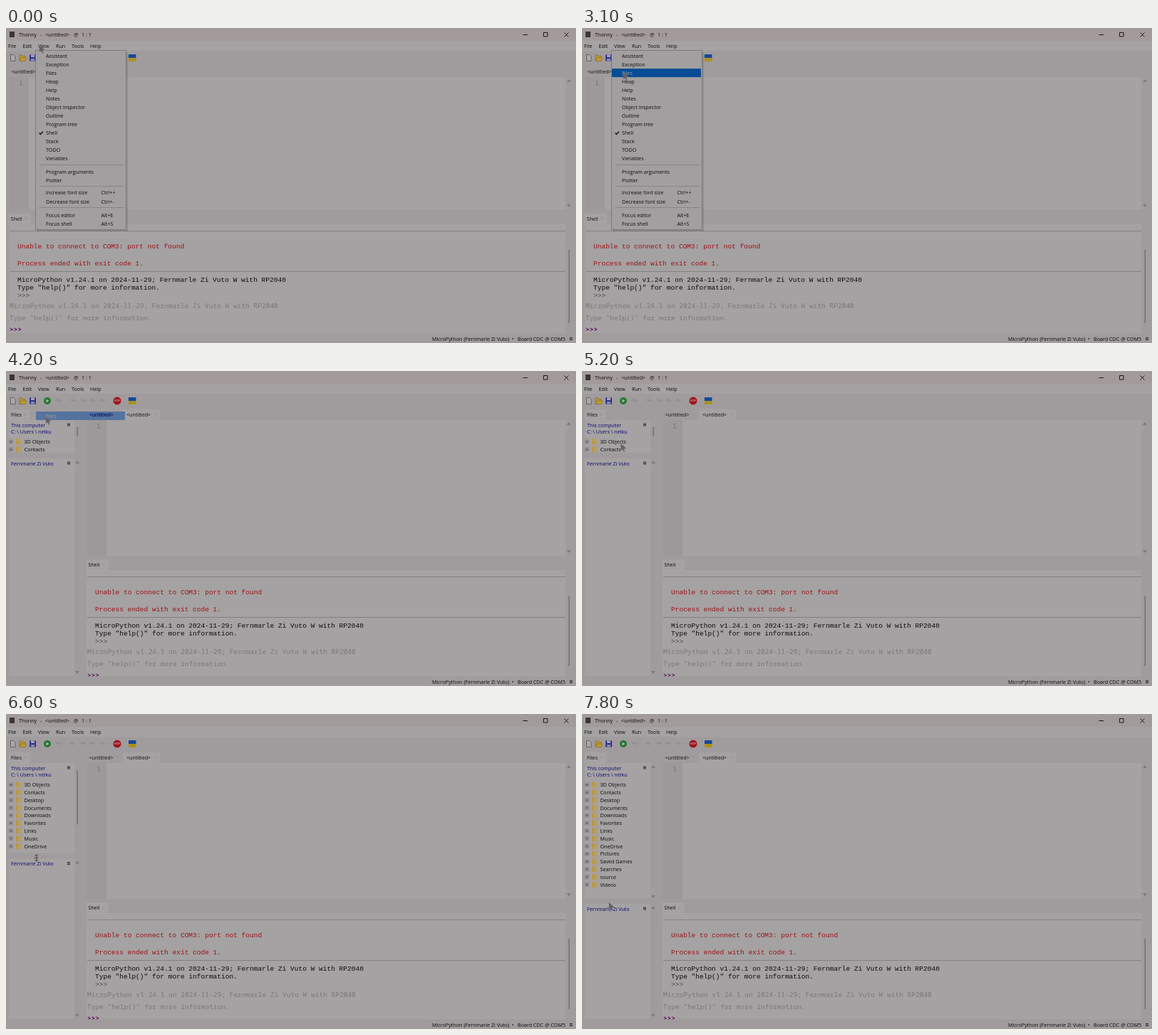
Recreate the animation shown at these times as an HTML page. Size 800 by 443 pixels, loop 8100 ms.

```html
<!DOCTYPE html>
<html lang="en">
<head>
<meta charset="utf-8">
<style>
  html, body { margin: 0; height: 100%; overflow: hidden; background: #a09c9d; }
  svg { display: block; width: 100vw; height: 100vh; }
  text { font: 7.2px "Open Sans", sans-serif; fill: #0d0b0c; white-space: pre; }
  .mono { font: 9.52px "Liberation Mono", monospace; }
  .log { font: 9.52px "Noto Sans Mono", monospace; fill: #7b7778; }
  .prompt { font: bold 9.52px "Noto Sans Mono", monospace; fill: #5a0a55; }
  .number { font: 9.52px "Noto Sans Mono", monospace; fill: #737072; }
  .stop { font: bold 3.2px "Open Sans", sans-serif; fill: #b8a5a6; text-anchor: middle; }
  .red { fill: #9c1216; }
  .blue { fill: #0a0870; }
  .dim { fill: #4b494b; }
  .pale { fill: #a5a2a3; }
</style>
</head>
<body>
<svg id="stage" viewBox="0 0 800 443" preserveAspectRatio="none"></svg>
<script>
const LOOP = 8100, STEP = 100;
const CHROME = '#a09c9d', PAPER = '#a5a2a3', GUTTER = '#9d999b', INK = '#0d0b0c';
const BOARD = 'Fernmarle Zi Vuto';
const CLOSE = 4100;
const FOLDERS = ['3D Objects', 'Contacts', 'Desktop', 'Documents', 'Downloads', 'Favorites', 'Links',
  'Music', 'OneDrive', 'Pictures', 'Saved Games', 'Searches', 'source', 'Videos'];
const VIEWS = ['Assistant', 'Exception', 'Files', 'Heap', 'Help', 'Notes', 'Object inspector', 'Outline',
  'Program tree', 'Shell', 'Stack', 'TODO', 'Variables'];

const escape = s => s.replace(/&/g, '&amp;').replace(/</g, '&lt;').replace(/>/g, '&gt;');
// y is the middle of the line
const text = (x, y, s, cls = '') => `<text x="${x}" y="${y + 2.6}" class="${cls}">${escape(s)}</text>`;
const rect = (x, y, w, h, fill, extra = '') =>
  `<rect x="${x}" y="${y}" width="${w}" height="${h}" fill="${fill}" ${extra}/>`;
const path = (d, stroke, width = 1, fill = 'none') =>
  `<path d="${d}" stroke="${stroke}" stroke-width="${width}" fill="${fill}"/>`;
const circle = (x, y, r, fill) => `<circle cx="${x}" cy="${y}" r="${r}" fill="${fill}"/>`;
const arrow = (x, y, dir) => path(`M${x - 3} ${y + 2 * dir}h6l-3 ${-4 * dir}z`, 'none', 0, '#7d797b');
const bars = (x, y) => path(`M${x - 2} ${y - 1.5}h4m-4 1.5h4m-4 1.5h4`, '#1c1a1b', 0.8);
const cross = (x, y) => path(`M${x - 1.5} ${y - 1.5}l3 3m0 -3l-3 3`, '#8f8b8d', 0.6);

// interpolates through [time, value] points
function track(t, points) {
  if (t <= points[0][0]) return points[0][1];
  for (let i = 1; i < points.length; i++) {
    const [t0, v0] = points[i - 1], [t1, v1] = points[i];
    if (t <= t1) return v0 + (v1 - v0) * (t - t0) / (t1 - t0);
  }
  return points[points.length - 1][1];
}

function windowBar() {
  return rect(0, 0, 800, 443, CHROME) + rect(0, 0, 800, 18, '#a39b99') + rect(0, 18, 800, 14, PAPER)
    + rect(5, 5, 7, 8, '#3a3738')
    + text(18, 9, 'Thonny') + text(48, 9, '-') + text(55, 9, '<untitled>') + text(95, 9, '@') + text(106, 9, '1 : 1')
    + path('M725.5 9.5h6.5M754.5 6.5h5.5v5.5h-5.5zM783.5 6.5l6 6m0 -6l-6 6', INK, 0.9)
    + [[3, 'File'], [23.5, 'Edit'], [45, 'View'], [70, 'Run'], [92, 'Tools'], [118, 'Help']]
      .map(([x, s]) => text(x, 25.5, s)).join('');
}

function toolbar() {
  const steps = [73, 93, 108, 121, 135]
    .map(x => path(`M${x - 3} 42q3 -4 5 0m-2 -1l2 2l2 -2`, '#918d8f', 1.3)).join('');
  return path('M6.5 37.5h4l2.5 2.5v6.5h-6.5z', '#555254', 0.8, '#aaa8a9')
    + path('M19 46v-8h3l1 1.5h4v2', '#8a6a1c', 0.8, '#b89a42') + path('M19 46.5l2 -4.5h8l-2 4.5z', '#7d5f16', 0.6, '#c09c35')
    + rect(33, 37.5, 9, 9, '#30318c') + rect(35, 37.5, 5, 3.5, '#a5a2b5') + rect(35, 43, 5, 3.5, '#8c8aa6')
    + circle(58, 42, 5, '#1f7a2e') + path('M56.5 39.5l4 2.5l-4 2.5z', 'none', 0, '#b0b5ae')
    + steps
    + path('M153.8 36.7h4.4l3.1 3.1v4.4l-3.1 3.1h-4.4l-3.1 -3.1v-4.4z', 'none', 0, '#a0141a')
    + text(156, 40.6, 'STOP', 'stop')
    + rect(172, 37, 10.5, 5, '#17479a') + rect(172, 42, 10.5, 5, '#ab911b');
}

// x and y move when the side pane opens
function workspace(open) {
  const x = open ? 109 : 0, y = open ? 4 : 0, left = 4 + x, bottom = open ? 260 : 255;
  const width = 781 - x;
  return text(left + 3.5, 61, '<untitled>') + cross(left + 44, 61)
    + rect(left + 51, 54, 52, 15, PAPER) + text(left + 56, 61, '<untitled>') + cross(left + 97, 61)
    + rect(left, 69, width, bottom - 69, PAPER) + rect(left, 69, 28, bottom - 69, GUTTER)
    + text(x + 18, 78, '1', 'number')
    + arrow(790, 74, 1) + arrow(790, 250 + y, -1)
    + rect(left, 261 + y, 31, 15, PAPER) + text(x + 6.5, 268 + y, 'Shell') + cross(x + 28, 268 + y)
    + rect(left, 276 + y, width, 154 - y, PAPER)
    + path(`M${x + 5} ${285.5 + y}H785M${x + 5} ${342.5 + y}H785`, '#838081')
    + text(x + 16, 307.5 + y, 'Unable to connect to COM3: port not found', 'mono red')
    + text(x + 16, 331.3 + y, 'Process ended with exit code 1.', 'mono red')
    + text(x + 16, 354.3 + y, `MicroPython v1.24.1 on 2024-11-29; ${BOARD} W with RP2040`, 'mono')
    + text(x + 16, 365.3 + y, 'Type "help()" for more information.', 'mono')
    + text(x + 16, 376 + y, '>>>', 'mono dim')
    + text(x + 5, 391 + y, `MicroPython v1.24.1 on 2024-11-29; ${BOARD} W with RP2040`, 'log')
    + text(x + 5, 408.7 + y, 'Type "help()" for more information.', 'log')
    + text(x + 5, 424.3 + y, '>>>', 'prompt')
    + rect(789.6, open ? 316 : 312, 1.2, open ? 99 : 103, '#696567')
    + rect(0, 429.5, 800, 13.5, CHROME)
    + text(598, 437, `MicroPython (${BOARD})`) + text(710, 437, '•') + text(718, 437, 'Board CDC @ COM5') + bars(793, 437);
}

function sidePane(split) {
  const shown = Math.min(FOLDERS.length, Math.floor((split - 106) / 10.8));
  const rows = FOLDERS.slice(0, shown).map((name, i) => {
    const y = 99.5 + i * 10.8;
    return path(`M4.5 ${y - 2.5}h5v5h-5z`, '#7b7779', 0.7) + path(`M5.5 ${y}h3m-1.5 -1.5v3`, '#333032', 0.7)
      + rect(14, y - 4, 4.5, 8, '#b3974a') + rect(15.5, y - 3, 5.5, 7, '#b89f58') + text(25.5, y, name);
  }).join('');
  const thumb = Math.max(13, (split - 89) ** 2 / 193);
  const scroll = shown < FOLDERS.length
    ? rect(99.5, 79, 1.2, thumb, '#696567')
    : arrow(100, 74, 1) + arrow(100, 257, -1);
  return rect(4, 54, 30, 15, PAPER) + text(7, 61, 'Files') + cross(27, 61)
    + rect(4, 69, 92, split - 84, PAPER) + rect(4, split - 7, 92, 436 - split, PAPER)
    + text(7, 76, 'This computer', 'blue') + text(7, 85.5, 'C: \\ Users \\ nelku', 'blue') + bars(88, 75.5)
    + rows + scroll
    + text(7, split, BOARD, 'blue') + bars(88, split - 0.5)
    + arrow(100, split - 2, 1) + arrow(100, 424, -1);
}

function menu(pointerY) {
  const hover = Math.floor((pointerY - 33) / 12.1);
  const views = VIEWS.map((name, i) => {
    const y = 39 + i * 12.06, on = i === hover;
    return (on ? rect(42, y - 6, 125, 12, '#084c95') : '') + text(56, y, name, on ? 'pale' : '');
  }).join('');
  const rest = [[202, 'Program arguments'], [214, 'Plotter'], [231.5, 'Increase font size', 'Ctrl++'],
    [244, 'Decrease font size', 'Ctrl+-'], [263, 'Focus editor', 'Alt+E'], [275, 'Focus shell', 'Alt+S']]
    .map(([y, name, keys = '']) => text(56, y, name) + text(133.5, y, keys)).join('');
  return rect(43, 34, 128, 252, '#000', 'opacity=".12"')
    + rect(41.5, 31.5, 127, 252, '#a29fa0', 'stroke="#777375" stroke-width=".8"')
    + views + rest
    + path('M46 192.5H166M46 222.5H166M46 252.5H166', '#827e80', 0.8)
    + path('M46.5 147.5l2 2l3.5 -4', INK, 1.2);
}

function pointer(x, y, resizing) {
  return resizing
    ? path(`M${x} ${y - 5}v10m-2.5 -7.5l2.5 -2.5l2.5 2.5m-5 5l2.5 2.5l2.5 -2.5M${x - 3} ${y}h6`, '#4d4a4c', 1)
    : path(`M${x} ${y}v10l2.4 -2l1.6 3.5l1.5 -.7l-1.6 -3.5l3.3 -.3z`, '#807c7e', 0.5, '#625e60');
}

function draw(t) {
  const open = t >= CLOSE;
  const split = track(t, [[6030, 130], [6200, 154], [6900, 253], [7300, 274]]);
  const x = track(t, [[2700, 47], [3100, 58], [3600, 56], [4600, 56], [5500, 54], [6000, 53], [6200, 49], [6900, 38]]);
  const y = t < 6000
    ? track(t, [[2700, 24], [3100, 62], [3600, 64], [4600, 64], [5500, 121]])
    : split - track(t, [[6000, 8], [6200, 6], [6900, 10], [7300, 9]]);
  let out = windowBar() + toolbar() + workspace(open);
  if (open) {
    const fade = track(t, [[CLOSE, 0.75], [4200, 0.6], [4500, 0]]);
    out += sidePane(split);
    if (fade) out += `<g opacity="${fade}">${rect(42, 57, 125, 12, '#2358a0')}${text(56, 63, 'Files', 'pale')}</g>`
      + text(116.5, 61, '<untitled>', 'blue');
  } else {
    out += menu(y);
  }
  return out + pointer(x, y, t >= 5600 && t < 6800);
}

const stage = document.getElementById('stage');
let last = -1;
function tick(now) {
  const t = Math.floor(now % LOOP / STEP) * STEP;
  if (t !== last) stage.innerHTML = draw(last = t);
  requestAnimationFrame(tick);
}
tick(performance.now());
</script>
</body>
</html>
```
